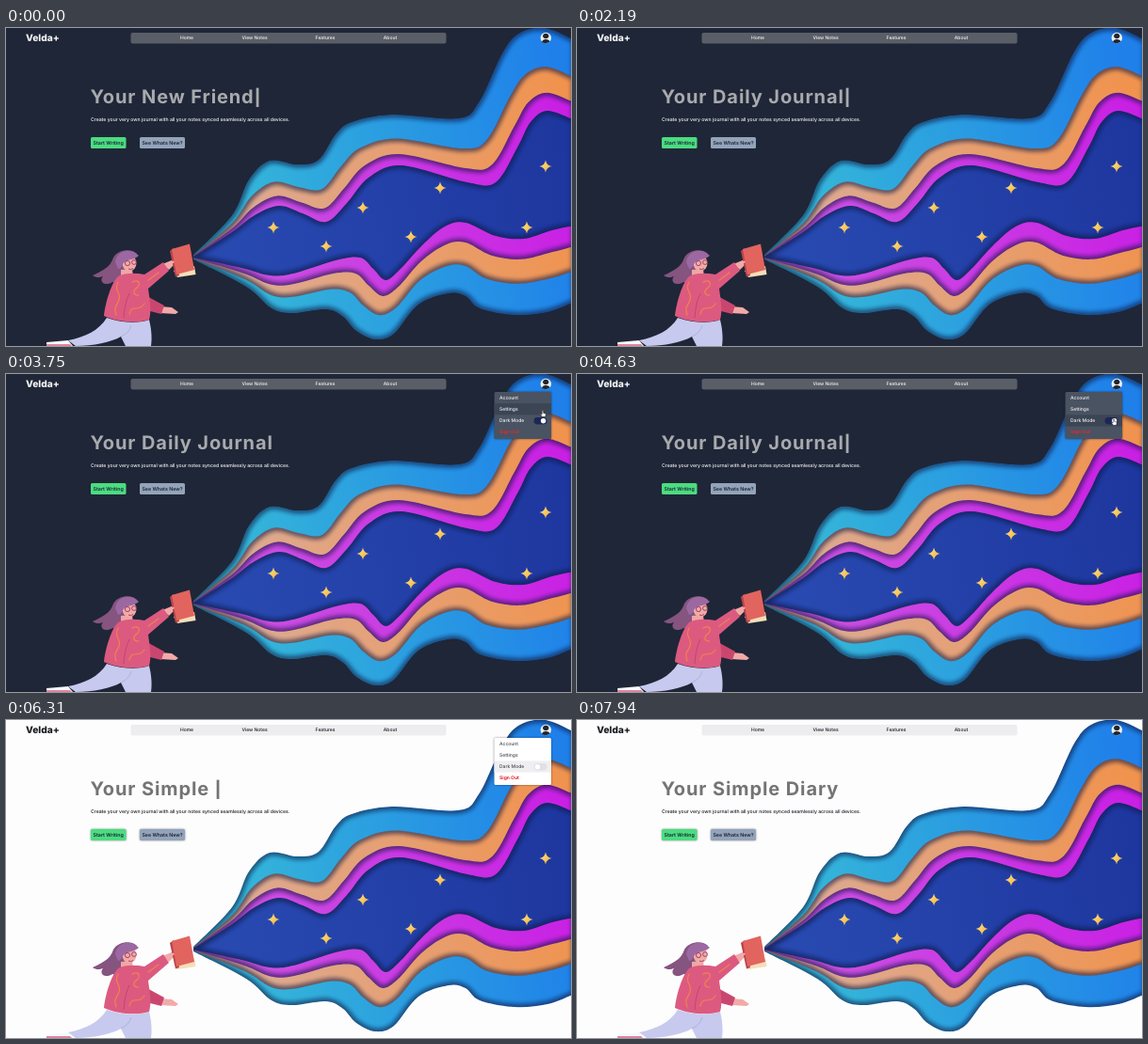
These frames come from a looping animation (600 by 338 pixels, 8000 ms). An HTML page:

```html
<!DOCTYPE html>
<html lang="en">
<head>
<meta charset="utf-8">
<title>Journal landing page</title>
<style>
html, body { margin: 0; width: 100%; height: 100%; overflow: hidden; }
svg {
  --page: #1f2637; --ink: #f6f7f9; --title: #a8aaad; --bar: #5a5e67;
  --menu: #4a5362; --hover: #3c4554; --danger: #d92c35;
  display: block; width: 100vw; height: 100vh; background: var(--page);
  font: 500 5px Inter, "Open Sans", sans-serif; text-rendering: geometricPrecision;
}
svg.light {
  --page: #fdfdfe; --ink: #17191f; --title: #747474; --bar: #ededf0;
  --menu: #ffffff; --hover: #efeff1; --danger: #e51c20;
}
text { fill: var(--ink); white-space: pre; }
#title { font-size: 20px; font-weight: 700; letter-spacing: .9px; fill: var(--title); }
#caret { font-size: 17px; font-weight: 800; }
.logo { font-size: 10.2px; font-weight: 800; }
.lead { font-size: 5.13px; }
.button text { font-size: 5.3px; font-weight: 600; fill: #1b2433; }
.light .button rect, #menu > rect:first-child { filter: drop-shadow(0 .6px 1px #0007); }
.danger { fill: var(--danger); font-weight: 700; }
.light #menu text:not(.danger) { fill: #44464c; }
.rim { fill: none; stroke: #0d1840; stroke-width: 7; opacity: .6; filter: url(#soft); }
</style>
</head>
<body>
<svg id="stage" viewBox="0 0 600 338" preserveAspectRatio="none">
  <defs>
    <filter id="soft" x="-10%" y="-10%" width="120%" height="120%">
      <feGaussianBlur stdDeviation="2.3"/>
    </filter>
    <linearGradient id="gold" x2="1" y2="1">
      <stop stop-color="#ffe58a"/><stop offset="1" stop-color="#f3ae35"/>
    </linearGradient>
  </defs>

  <g id="waves"></g>
  <g id="stars" fill="url(#gold)"></g>

  <g id="reader">
    <path fill="#85547f" d="M139 240C134 234 119 235 114 244C111 254 104 257 92 263C96 266 100 265 103 264C98 270 106 275 113 270C123 273 128 262 129 252Z"/>
    <path fill="#f0a6a4" d="M122 257L134 256L135 265Q127 268 122 263Z"/>
    <ellipse cx="131" cy="250" rx="7.500" ry="8.500" fill="#f2aaa8"/>
    <path fill="#9c68a2" d="M116 249C117 237 132 232 141 242C136 247 128 245 124 251Q122 256 119 256Z"/>
    <g fill="none" stroke="#8a2f58" stroke-width=".8">
      <circle cx="129" cy="250" r="2.600"/><circle cx="136" cy="249" r="2.400"/>
      <path d="M130 256q2.500 1.500 5-.5"/>
    </g>
    <path fill="#f8f8fc" d="M43 334L66 332L71 338H43Z"/>
    <path fill="#e0849f" d="M43 336h25l2 2H43Z"/>
    <path fill="#c7c9ee" d="M107 308C125 314 142 314 152 310C155 322 155 332 154 338H127L122 328C112 334 92 338 74 338L66 332C85 328 98 322 107 308Z"/>
    <path fill="none" stroke="#a9add9" stroke-width=".8" d="M122 328Q131 324 133 316"/>
    <path fill="#f2aaa8" d="M166 251L178 246L180 250L173 257ZM164 296L176 297L183 302L180 304L164 303Z"/>
    <path fill="#c9476f" d="M146 283L168 295L165 304L145 299Z"/>
    <path fill="#dc5a80" d="M119 264C112 271 106 290 104 306C119 313 140 314 152 310C155 300 152 285 151 277L173 258L167 249L147 262C137 260 126 260 119 264Z"/>
    <g fill="none" stroke="#f0814f" stroke-width="1.200" stroke-linecap="round">
      <path d="M119 270c-5 10 4 11 1 19s-6 7-3 16"/>
      <path d="M134 270c8-4 9 3 5 6s-5 8 2 8M131 304c3-12 10-1 16-11M151 268l11-8"/>
    </g>
    <path fill="none" stroke="#b9426a" stroke-width=".8" d="M131 282Q126 292 125 308"/>
    <path fill="#f4dfb8" d="M178 258L200 253L201.500 262L182 265Z"/>
    <path fill="#b8434c" d="M174 237L178 234L184 263L180 264.500Z"/>
    <path fill="#e2645f" d="M176 235L195 229.500L200 257L181 262Z"/>
    <path fill="#f2aaa8" d="M171 250L178 247.500L179 249L173 253Z"/>
  </g>

  <text class="logo" x="21" y="14.300">Velda+</text>
  <rect x="132.500" y="5" width="335" height="11.500" rx="2" fill="var(--bar)"/>
  <g text-anchor="middle">
    <text x="192" y="12.200">Home</text><text x="264" y="12.200">View Notes</text>
    <text x="339" y="12.200">Features</text><text x="408" y="12.200">About</text>
  </g>
  <circle cx="573.300" cy="10.500" r="5.700" fill="#eef0f2"/>
  <path fill="#25262b" d="M569 15Q570 12 573 12Q577 12 577.500 14.500Q573 17.500 569 15ZM570 8.500a3.300 3.300 0 0 1 6.500 0a3.300 3.300 0 0 1-6.500 0Z"/>

  <text id="title" x="89.500" y="79.500"><tspan id="words"></tspan><tspan id="caret">|</tspan></text>
  <text class="lead" x="90" y="98.900">Create your very own journal with all your notes synced seamlessly across all devices.</text>
  <g class="button" text-anchor="middle">
    <rect x="90" y="116" width="37.500" height="12" rx="1.500" fill="#4bdc80"/>
    <text x="108.700" y="124">Start Writing</text>
    <rect x="142" y="116" width="48" height="12" rx="1.500" fill="#93a3ba"/>
    <text x="166" y="124">See Whats New?</text>
  </g>

  <g id="menu">
    <rect x="518.500" y="19" width="60.500" height="50" rx="1.500" fill="var(--menu)"/>
    <rect id="hover" x="518.500" width="60.500" height="12.200" fill="var(--hover)"/>
    <text x="524" y="27.400">Account</text><text x="524" y="39.400">Settings</text>
    <text x="524" y="51.400">Dark Mode</text><text class="danger" x="524" y="63.400">Sign Out</text>
    <rect id="track" x="560.500" y="46" width="14" height="7.600" rx="3.800"/>
    <circle id="knob" cy="49.800" r="2.700" fill="#fff"/>
  </g>
  <path id="pointer" fill="#fff" stroke="#111" stroke-width=".5" d="M-.8 0q.8-1.200 1.500 0v2.400l2 .6q.8.300.5 1.400L2.700 6.500H-.6L-2.400 3.800q0-1 1.600 0Z"/>
</svg>

<script>
const LOOP = 8000, THEME_AT = 5190, BLINK = 590;
const $ = id => document.getElementById(id);
const clamp = v => Math.max(0, Math.min(1, v));
const mix = (a, b, k) => a + (b - a) * k;
const ramp = (t, start, length) => clamp((t - start) / length);
const smooth = k => k * k * (3 - 2 * k);
const parse = text => text.split(" ").map(pair => pair.split(",").map(Number));

function add(parent, tag, attrs) {
  const node = document.createElementNS("http://www.w3.org/2000/svg", tag);
  for (const key in attrs) node.setAttribute(key, attrs[key]);
  return parent.appendChild(node);
}

// Catmull-Rom spline through the points, as Bezier commands.
function spline(points) {
  const at = i => points[Math.max(0, Math.min(points.length - 1, i))];
  return points.slice(1).map((c, i) => {
    const a = at(i - 1), b = at(i), e = at(i + 2);
    return `C${b.map((v, k) => v + (c[k] - a[k]) / 6)} ${c.map((v, k) => v - (e[k] - b[k]) / 6)} ${c}`;
  }).join("");
}

// Every sheet lies between an outer outline and the core; its edges are blends of the two.
const upper = {
  outer: parse("199,241 240,199 258,161 280,141 310,145 332,140 350,113 367,100 410,92 480,96 502,79 528,25 546,5 573,0 604,13"),
  core: parse("199,243 240,217 264,199 290,189 315,197 340,206 362,186 385,159 420,146 490,164 520,164 543,127 557,100 575,88 604,98")
};
const lower = {
  outer: parse("199,246 255,275 282,298 304,303 340,299 358,307 372,322 392,331 412,325 438,294 470,282 488,285 503,298 540,305 575,302 604,291"),
  core: parse("199,244 250,255 280,263 305,261 350,247 376,244 390,256 403,268 418,257 442,231 466,211 488,207 520,221 550,224 580,215 604,210")
};
const blend = (edge, k) => edge.outer.map((p, i) => p.map((v, axis) => mix(v, edge.core[i][axis], k)));

function addSheet(name, left, right, upperMix, lowerMix) {
  const top = blend(upper, upperMix), bottom = blend(lower, lowerMix).reverse();
  const d = `M${top[0]}${spline(top)}L${bottom[0]}${spline(bottom)}Z`;
  const defs = document.querySelector("defs");
  const gradient = add(defs, "linearGradient",
    { id: name, gradientUnits: "userSpaceOnUse", x1: 240, x2: 600, y1: 220, y2: 160 });
  add(gradient, "stop", { "stop-color": left });
  add(gradient, "stop", { offset: 1, "stop-color": right });
  add(add(defs, "clipPath", { id: name + "Clip" }), "path", { d });
  const sheet = add($("waves"), "g", { "clip-path": `url(#${name}Clip)` });
  add(sheet, "path", { d, fill: `url(#${name})` });
  add(sheet, "path", { d, class: "rim" });
}
addSheet("cyan", "#35b8d8", "#1f80ea", 0, 0);
addSheet("orange", "#dcab94", "#f0934f", .47, .41);
addSheet("magenta", "#cb52e2", "#c920e4", .78, .73);
addSheet("blue", "#2849b0", "#1e379f", 1, 1);

for (const [x, y] of parse("284,212 340,232 379,191 430,222 461,170 553,212 573,147"))
  add($("stars"), "path", {
    transform: `translate(${x} ${y})`,
    d: "M0-6.5Q1-1 6.5 0Q1 1 0 6.5Q-1 1-6.5 0Q-1-1 0-6.5Z"
  });

// A positive pace types a phrase, a negative one erases it, in ms per letter.
const typing = [
  { start: 0, phrase: "New Friend", pace: -68 },
  { start: 728, phrase: "Daily Journal", pace: 62 },
  { start: 4760, phrase: "Daily Journal", pace: -68 },
  { start: 5680, phrase: "Simple Diary", pace: 86 }
];
function phraseAt(t) {
  const { start, phrase, pace } = typing.findLast(run => t >= run.start);
  const moved = Math.floor((t - start) / Math.abs(pace));
  return phrase.slice(0, pace > 0 ? moved : Math.max(0, phrase.length - moved));
}

function draw(t) {
  $("stage").classList.toggle("light", t >= THEME_AT);

  $("words").textContent = "Your " + phraseAt(t);
  $("caret").style.opacity = (t + 247) % BLINK < BLINK / 2 ? 1 : 0;

  // The pointer goes from the avatar to Settings, then to the switch.
  const y = 11 + 28 * smooth(ramp(t, 3050, 600)) + 9 * smooth(ramp(t, 4150, 300));
  $("pointer").setAttribute("transform", `translate(570 ${y})`);
  $("pointer").style.opacity = t >= 2900 && t < THEME_AT ? 1 : 0;

  $("menu").style.opacity = ramp(t, 3100, 100) - ramp(t, 7500, 100);
  const row = Math.floor((y - 19) / 12.2);
  $("hover").setAttribute("y", 19 + 12.2 * row);
  $("hover").style.opacity = row < 0 ? 0 : 1;

  const off = ramp(t, THEME_AT + 70, 180);
  $("knob").setAttribute("cx", mix(570.6, 564.4, off));
  $("track").style.fill = `color-mix(in srgb, #dfe1e6 ${off * 100}%, #1d2757)`;
}

const begin = performance.now();
function tick() {
  draw((performance.now() - begin) % LOOP);
  requestAnimationFrame(tick);
}
tick();
</script>
</body>
</html>
```
